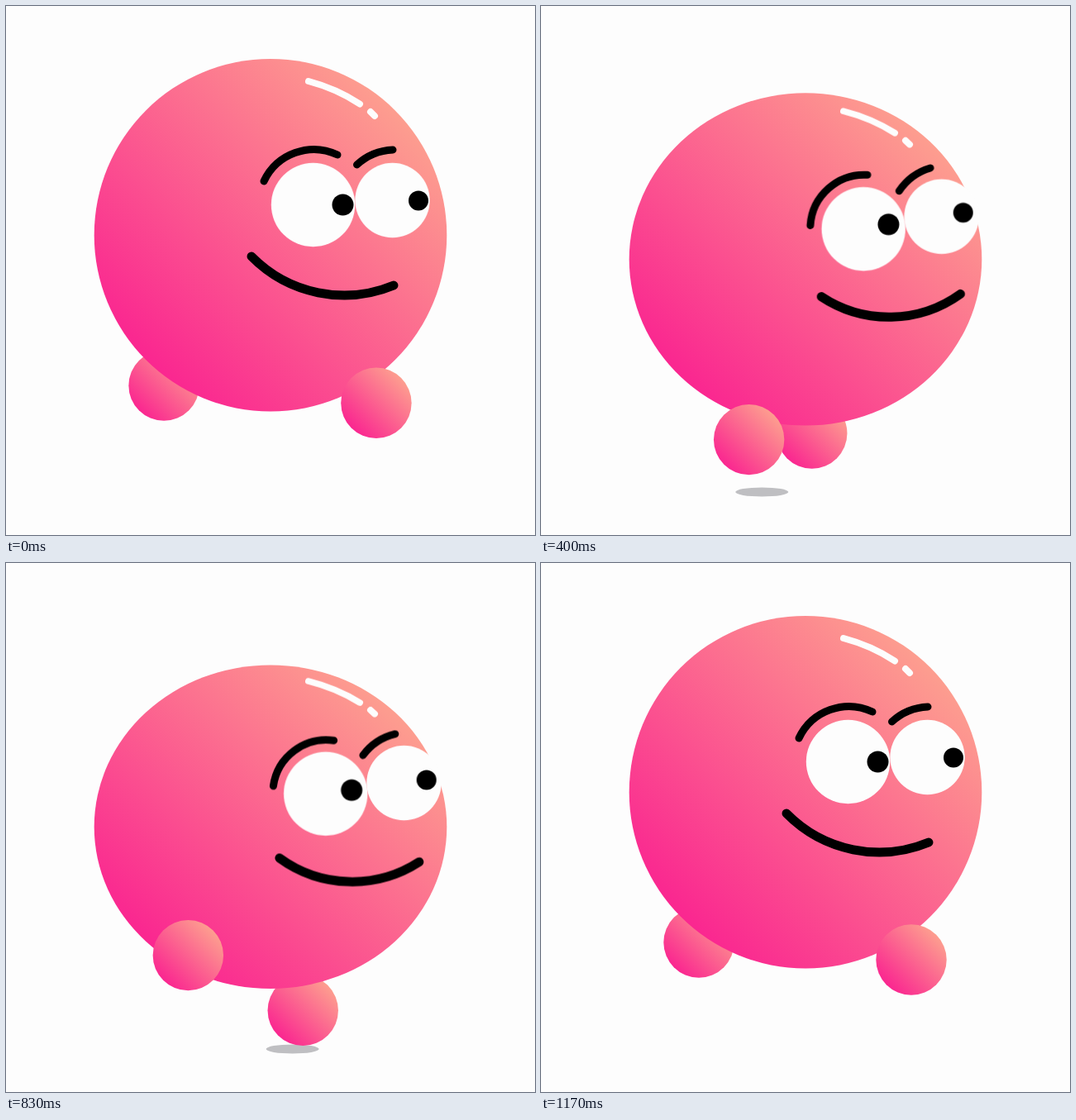
An HTML page for the animation above (1210 ms loop, 640 px wide and 640 px high).

```html
<!DOCTYPE html>
<html lang="en">
<head>
<meta charset="utf-8">
<title>Walking ball</title>
<style>
  html, body { margin: 0; height: 100%; overflow: hidden; background: #fdfdfd; }
  svg { display: block; width: 100vw; height: 100vh; }

  svg * { animation: 1210ms linear infinite; }

  .body { animation-name: squash; }
  .shine { animation-name: shine; transform-origin: 366px 91px; }
  .face { animation-name: bob; }
  .look { animation-name: look; }
  .line { d: var(--a); animation-name: morph; }
  .front { animation-name: front-x, front-y; }
  .back { animation-name: back-x, back-y; }
  .shade-front { animation-name: shade-front-x, shade-front-size; }
  .shade-back { animation-name: shade-back-x, shade-back-size; }

  .stroke { fill: none; stroke: #000; stroke-linecap: round; }

  /* Body: two bounces per loop */
  @keyframes squash {
    0%, 47.6% { cy: 277.2px; ry: 213.3px; animation-timing-function: cubic-bezier(.27, 0, .833, .833); }
    24.8%, 73.1% { cy: 330.2px; ry: 191.2px; animation-timing-function: cubic-bezier(.167, .167, .73, 1); }
    96.4%, 100% { cy: 277.2px; ry: 213.3px; }
  }
  @keyframes shine {
    0%, 47.6% { transform: translateY(0) scaleY(1); animation-timing-function: cubic-bezier(.27, 0, .833, .833); }
    24.8%, 73.1% { transform: translateY(65.5px) scaleY(.93); animation-timing-function: cubic-bezier(.167, .167, .73, 1); }
    96.4%, 100% { transform: translateY(0) scaleY(1); }
  }
  @keyframes bob {
    0%, 47.6% { transform: translate(0, 0); animation-timing-function: cubic-bezier(.27, 0, .833, .833); }
    24.8%, 73.1% { transform: translate(1.2px, 43.5px); animation-timing-function: cubic-bezier(.167, .167, .73, 1); }
    96.4%, 100% { transform: translate(0, 0); }
  }

  /* Face: one turn and back per loop */
  @keyframes look {
    0% { transform: translate(0, 0); animation-timing-function: cubic-bezier(.333, .04, .667, .82); }
    47.8% { transform: translate(var(--x), var(--y)); animation-timing-function: cubic-bezier(.333, .22, .667, .86); }
    96.4%, 100% { transform: translate(0, 0); }
  }
  @keyframes morph {
    0% { d: var(--a); animation-timing-function: cubic-bezier(.333, .04, .667, .82); }
    47.8% { d: var(--b); animation-timing-function: cubic-bezier(.333, .22, .667, .86); }
    96.4%, 100% { d: var(--a); }
  }

  /* Feet: the same walk, half a loop apart */
  @keyframes front-x {
    0% { cx: 448px; animation-timing-function: cubic-bezier(.333, .055, .667, .438); }
    24.8% { cx: 320px; animation-timing-function: cubic-bezier(.333, .558, .667, 1.008); }
    48.7% { cx: 191px; animation-timing-function: cubic-bezier(.333, .18, .667, .564); }
    73.5% { cx: 230px; animation-timing-function: cubic-bezier(.333, .312, .667, 1.124); }
    96.4%, 100% { cx: 448px; }
  }
  @keyframes front-y {
    0% { cy: 480px; animation-timing-function: cubic-bezier(.333, .46, .667, 1); }
    24.8% { cy: 545px; animation-timing-function: cubic-bezier(.333, -.08, .667, .965); }
    48.7% { cy: 459px; animation-timing-function: cubic-bezier(.333, .65, .667, .43); }
    73.5% { cy: 480px; animation-timing-function: cubic-bezier(.2, .6, .6, 1); }
    81.3% { cy: 517px; animation-timing-function: cubic-bezier(.3, .3, .6, 1); }
    96.4%, 100% { cy: 480px; }
  }
  @keyframes back-x {
    0% { cx: 191px; animation-timing-function: cubic-bezier(.333, .18, .667, .564); }
    24.8% { cx: 230px; animation-timing-function: cubic-bezier(.333, .312, .667, 1.124); }
    48.7% { cx: 448px; animation-timing-function: cubic-bezier(.333, .055, .667, .438); }
    73.5% { cx: 320px; animation-timing-function: cubic-bezier(.333, .558, .667, 1.008); }
    96.4%, 100% { cx: 191px; }
  }
  @keyframes back-y {
    0% { cy: 459px; animation-timing-function: cubic-bezier(.333, .65, .667, .43); }
    24.8% { cy: 480px; animation-timing-function: cubic-bezier(.2, .6, .6, 1); }
    33.3% { cy: 517px; animation-timing-function: cubic-bezier(.3, .3, .6, 1); }
    48.7% { cy: 480px; animation-timing-function: cubic-bezier(.333, .46, .667, 1); }
    73.5% { cy: 545px; animation-timing-function: cubic-bezier(.333, -.08, .667, .965); }
    96.4%, 100% { cy: 459px; }
  }

  @keyframes shade-front-x {
    0% { cx: 448px; }
    24.8% { cx: 320px; }
    48.2%, 100% { cx: 172px; }
  }
  @keyframes shade-front-size {
    0%, 44.4%, 100% { rx: 0px; ry: 0px; }
    8.3%, 36.4% { rx: 32px; ry: 5.5px; }
  }
  @keyframes shade-back-x {
    0%, 48.8% { cx: 448px; }
    73.9% { cx: 320px; }
    96.4%, 100% { cx: 172px; }
  }
  @keyframes shade-back-size {
    0%, 48.8%, 92.3%, 100% { rx: 0px; ry: 0px; }
    56.2%, 84.3% { rx: 32px; ry: 5.5px; }
  }
</style>
</head>
<body>
<svg viewBox="0 0 640 640">
  <defs>
    <linearGradient id="skin" x1="1" y1="0" x2="0" y2="1">
      <stop offset=".15" stop-color="#fd9d8f"/>
      <stop offset=".85" stop-color="#fa2790"/>
    </linearGradient>
  </defs>

  <g fill="#bfbfc2">
    <ellipse class="shade-back" cy="588"/>
    <ellipse class="shade-front" cy="588"/>
  </g>

  <g fill="url(#skin)">
    <circle class="back" r="42.7"/>
    <ellipse class="body" cx="320" rx="213.3"/>
  </g>

  <g class="shine" fill="none" stroke="#fdfdfd" stroke-width="8" stroke-linecap="round">
    <path d="M366 91Q400 100 428 118.5M441 128L446 133"/>
  </g>

  <g class="face">
    <g fill="#fdfdfd">
      <circle class="look" cx="371.5" cy="240.5" r="50.7" style="--x:25.6px;--y:7.5px"/>
      <circle class="look" cx="467.5" cy="235" r="45.2" style="--x:23.4px;--y:-6.1px"/>
    </g>
    <circle class="look" cx="407.5" cy="240.5" r="13" style="--x:17.4px;--y:-.4px"/>
    <circle class="look" cx="499" cy="235.5" r="12" style="--x:15.7px;--y:-13.5px"/>
    <g class="stroke" stroke-width="9">
      <path class="line" style="
        --a:path('M312 212C327.8 178.5 367.5 164.3 401 180');
        --b:path('M330.7 253.8C327.2 217 354.6 183.9 391.4 180.4')"/>
      <path class="line" style="
        --a:path('M424.5 192C436.4 181.1 451.8 174.7 468 174');
        --b:path('M436 203C443.6 188.7 456.3 177.2 471.3 171.1')"/>
      <path class="line" stroke-width="11" style="
        --a:path('M297 303C341.9 348.6 409.9 362.5 469 338');
        --b:path('M356 338C410.1 367.2 476.7 359.4 522.7 318.6')"/>
    </g>
  </g>

  <circle class="front" r="42.7" fill="url(#skin)"/>
</svg>
</body>
</html>
```
